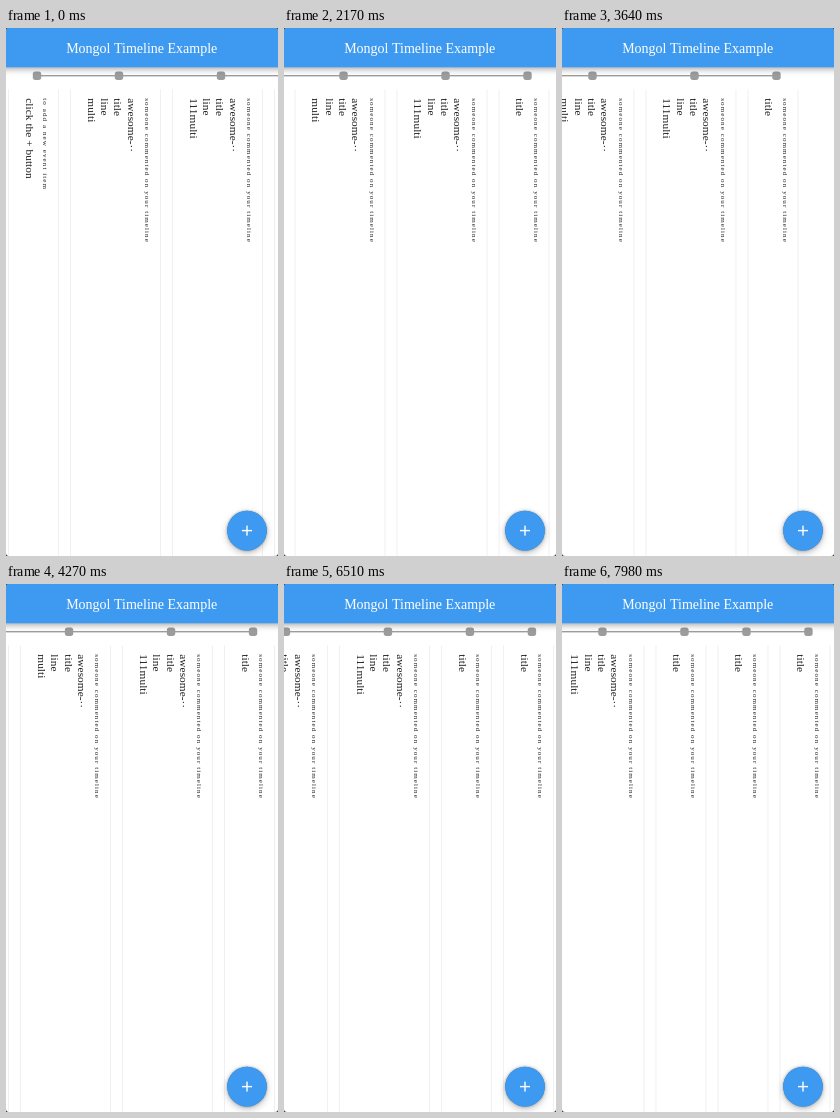
These frames come from a looping animation (272 by 528 pixels, 8000 ms). An HTML page with a canvas:

```html
<!DOCTYPE html>
<html lang="en">
<head>
<meta charset="utf-8">
<title>Timeline</title>
<style>
  html, body { margin: 0; width: 100%; height: 100%; overflow: hidden; background: #fff; }
  canvas { display: block; width: 272px; height: 528px; }
</style>
</head>
<body>
<canvas id="stage"></canvas>
<script>
const W = 272, H = 528, LOOP = 8000, STEP = 70;
const BLUE = '#3d9af0', GREY = '#9c9c9c', INK = '#212121';
const SERIF = '"Liberation Serif", "Times New Roman", serif';
const BAR_H = 39.3, RAIL_Y = 47.7, LINE_H = 13.33;
const FAB = { x: 241, y: 502.6, r: 19.8 };

const canvas = document.getElementById('stage');
const ctx = canvas.getContext('2d');
const ratio = window.devicePixelRatio || 1;
canvas.width = W * ratio;
canvas.height = H * ratio;

const COMMENT = 'someone commented on your timeline';
const single = { width: 62, lines: ['title'], note: COMMENT };
const multi = first => ({
  width: 102, lines: [first, 'line', 'title', 'awesome-··'], note: COMMENT
});
const items = [
  { width: 62, lines: ['click the + button'], note: 'to add a new event item' },
  multi('multi'), multi('111multi'), single, single, single
];

// Each swipe travels `by` pixels, running past its goal by `over` before springing back.
const RISE = 300, SPRING = 90;
const swipes = [
  { start: 910, by: 49, over: 4 },
  { start: 2030, by: 0, over: 10 },
  { start: 2720, by: -49, over: -5 },
  { start: 3430, by: 49, over: 55 },
  { start: 5670, by: 62, over: 4 },
  { start: 7350, by: 62, over: 13 }
];
const presses = [
  { start: 4970, end: 5250 },
  { start: 6860, end: 7070 }
];

function swipeOffset({ start, by, over }, t) {
  const age = t - start;
  if (age <= 0) return 0;
  if (age < RISE) return (by + over) * (1 - Math.cos(Math.PI * age / RISE)) / 2;
  const x = (age - RISE) / SPRING;
  return by + over * (1 + x) * Math.exp(-x);
}

const scrollAt = t => swipes.reduce((sum, swipe) => sum + swipeOffset(swipe, t), 0);

function shadow(color, blur, dy) {
  ctx.shadowColor = color;
  ctx.shadowBlur = blur * ratio;
  ctx.shadowOffsetY = dy * ratio;
}

function disc(x, y, r) {
  ctx.beginPath();
  ctx.arc(x, y, r, 0, Math.PI * 2);
  ctx.fill();
}

function verticalText(text, x, y, size, spacing) {
  ctx.save();
  ctx.translate(x, y);
  ctx.rotate(Math.PI / 2);
  ctx.font = `${size}px ${SERIF}`;
  ctx.letterSpacing = spacing + 'px';
  ctx.fillText(text, 0, 0);
  ctx.restore();
}

function drawItem(item, x) {
  ctx.fillStyle = '#f0f0f0';
  ctx.fillRect(x + 2, 61.5, 1, H);
  ctx.fillRect(x + item.width - 10, 61.5, 1, H);

  ctx.fillStyle = INK;
  item.lines.forEach((line, i) => verticalText(line, x + 19.8 + i * LINE_H, 70.3, 11.33, 0.04));
  const noteX = x + 37.2 + (item.lines.length - 1) * LINE_H;
  verticalText(item.note, noteX, 70.3, 7.08, 1.06);
}

function drawTimeline(t) {
  const count = 4 + presses.filter(p => t >= (p.start + p.end) / 2).length;
  const dots = [];
  let x = -scrollAt(t);
  for (const item of items.slice(0, count)) {
    if (x < W && x + item.width > 0) drawItem(item, x);
    dots.push(x + item.width / 2);
    x += item.width;
  }
  ctx.fillStyle = GREY;
  ctx.fillRect(dots[0], RAIL_Y - 0.7, dots[count - 1] - dots[0], 1.4);
  for (const dot of dots) {
    ctx.beginPath();
    ctx.roundRect(dot - 4.2, RAIL_Y - 4.2, 8.4, 8.4, 2.6);
    ctx.fill();
  }
}

function drawBar() {
  ctx.save();
  shadow('rgba(0,0,0,.4)', 7, 2);
  ctx.fillStyle = BLUE;
  ctx.fillRect(-10, -10, W + 20, BAR_H + 10);
  ctx.restore();
  ctx.fillStyle = '#fff';
  ctx.font = `14px ${SERIF}`;
  ctx.letterSpacing = '0px';
  ctx.textAlign = 'center';
  ctx.fillText('Mongol Timeline Example', 135.7, 24.6);
  ctx.textAlign = 'left';
}

function drawButton(t) {
  const { x, y, r } = FAB;
  const press = presses.find(p => t >= p.start && t < p.end);
  ctx.save();
  ctx.fillStyle = BLUE;
  shadow('rgba(0,0,0,.25)', press ? 9 : 7, press ? 4 : 2.5);
  disc(x, y, r);
  shadow('rgba(0,0,0,.35)', 2.5, 0);
  disc(x, y, r);
  ctx.restore();
  if (press) {
    const p = (t - press.start + STEP) / (press.end - press.start);
    ctx.fillStyle = 'rgba(255,255,255,.16)';
    disc(x, y, r * Math.min(1, 0.35 + 0.65 * p));
  }
  ctx.fillStyle = '#fff';
  ctx.fillRect(x - 5, y - 0.7, 10, 1.4);
  ctx.fillRect(x - 0.7, y - 5, 1.4, 10);
}

function draw(now) {
  const t = Math.floor((now % LOOP) / STEP) * STEP;
  ctx.setTransform(ratio, 0, 0, ratio, 0, 0);
  ctx.fillStyle = '#333';
  ctx.fillRect(0, 0, W, H);
  ctx.save();
  ctx.beginPath();
  ctx.roundRect(0, 0, W, H, 3);
  ctx.clip();
  ctx.fillStyle = '#fff';
  ctx.fillRect(0, 0, W, H);
  drawTimeline(t);
  drawBar();
  drawButton(t);
  ctx.restore();
}

const begin = performance.now();
function tick() {
  draw(performance.now() - begin);
  requestAnimationFrame(tick);
}
tick();
</script>
</body>
</html>
```
